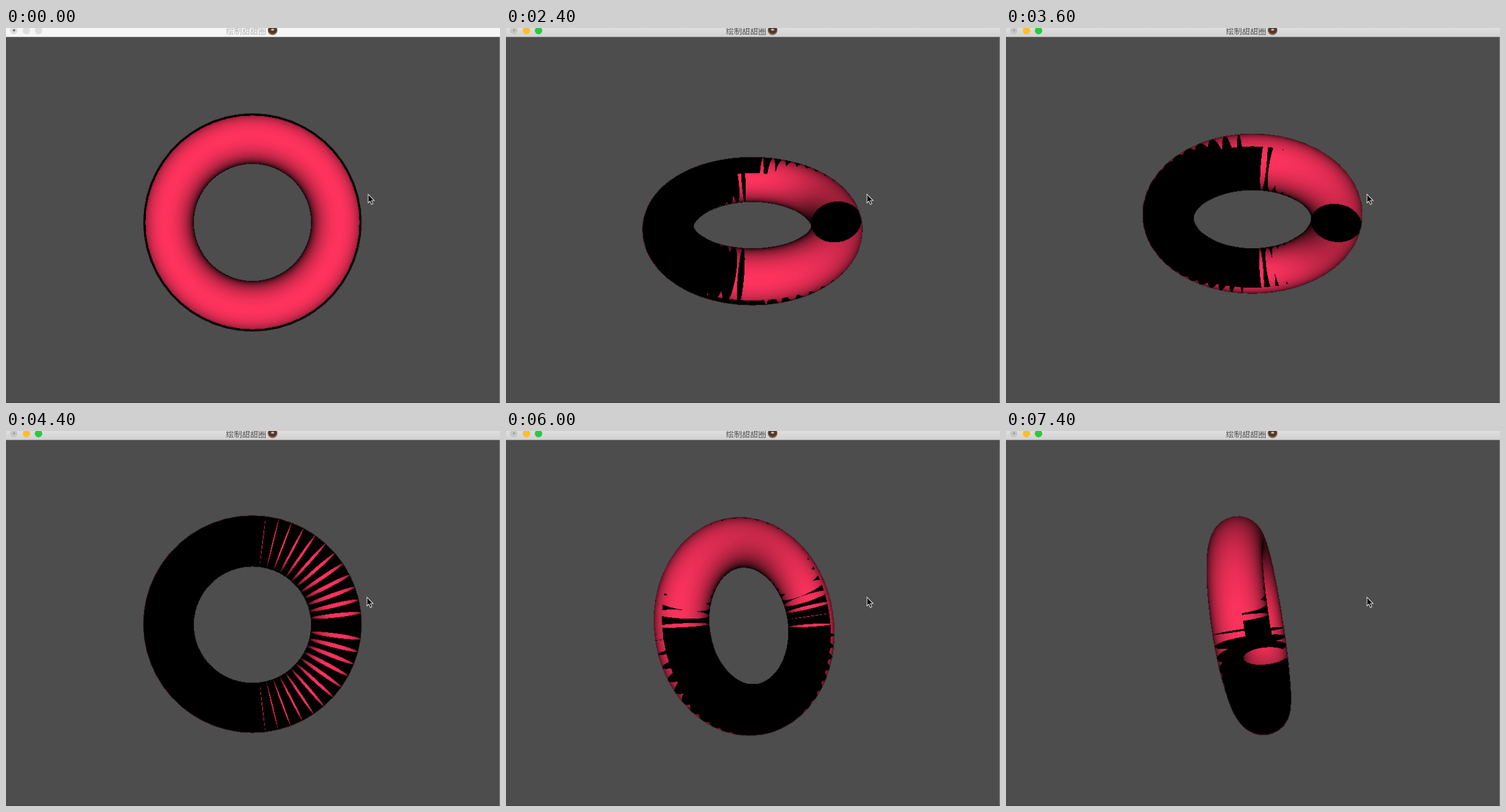
These frames come from a looping animation (858x652 px, 7600 ms). An HTML page with a canvas:

```html
<!DOCTYPE html>
<html lang="zh">
<head>
<meta charset="utf-8">
<title>绘制甜甜圈</title>
<style>
  html, body { margin: 0; width: 100%; height: 100%; overflow: hidden; background: #4d4d4d; }
  #stage { position: absolute; left: 0; top: 0; width: 858px; height: 652px; overflow: hidden; }
  #view { position: absolute; left: 0; top: 16.5px; width: 856px; height: 642px; }
  #edge { position: absolute; right: 0; top: 16px; width: 1px; height: 636px; background: #8a8a8a; }
  #base { position: absolute; left: 0; top: 651px; width: 858px; height: 1px; background: #474347; }
  #bar {
    position: absolute; left: 0; top: 0; width: 858px; height: 15px;
    background: #f6f6f6; border-bottom: 1px solid #acacac; color: #b4b4b4;
  }
  #bar.active { background: linear-gradient(#dfdfdf, #d1d1d1); border-color: #9a9a9a; color: #4c4c4c; }
  #bar i {
    position: absolute; top: -2.5px; width: 13px; height: 13px; border-radius: 50%;
    background: #dddddd;
  }
  #bar i:nth-of-type(1) { left: 7px; }
  #bar i:nth-of-type(2) { left: 28.5px; }
  #bar i:nth-of-type(3) { left: 50px; }
  #bar i:nth-of-type(1)::after {
    content: ""; position: absolute; left: 4.5px; top: 4.5px; width: 4px; height: 4px;
    border-radius: 50%; background: #6a6a6a;
  }
  #bar.active i:nth-of-type(1) { background: #c6c6c6; }
  #bar.active i:nth-of-type(1)::after { background: #a2a2a2; }
  #bar.active i:nth-of-type(2) { background: #fdbd2f; }
  #bar.active i:nth-of-type(3) { background: #2ac940; }
  #bar span {
    position: absolute; left: 382px; top: -6px; white-space: nowrap;
    font: 14px/20px "Noto Sans CJK SC", "Noto Sans CJK", sans-serif;
  }
  #bar svg { position: absolute; left: 453.5px; top: -5px; }
  #cursor { position: absolute; left: 628px; top: 288px; overflow: visible; }
  #cursor.active { left: 626px; }
</style>
</head>
<body>
<div id="stage">
  <canvas id="view" width="800" height="600"></canvas>
  <div id="edge"></div>
  <div id="base"></div>
  <div id="bar">
    <i></i><i></i><i></i>
    <span>绘制甜甜圈</span>
    <svg width="18" height="18">
      <circle cx="9" cy="9" r="8.5" fill="#8d6a4c"/>
      <ellipse cx="9" cy="8.3" rx="7.4" ry="6.6" fill="#50382e"/>
      <ellipse cx="9" cy="8" rx="2.8" ry="1.7" fill="#cfc2b6"/>
    </svg>
  </div>
  <svg id="cursor" width="14" height="21">
    <path d="M1 1V16L4.3 13L6.8 18.8L9.4 17.7L7 12H11.6Z" fill="#000" stroke="#e4e4e4" stroke-width="1.1"/>
  </svg>
</div>
<script>
const LOOP = 7600, TICK = 200, ACTIVATE = 600;
const W = 800, H = 600, DISTANCE = 7;
const FOCAL = H / 2 / Math.tan(17.5 * Math.PI / 180);
const MAJOR = 52, MINOR = 26, TUBE = 0.3;
const PINK = [255, 51, 94], GAMMA = 0.86;

const ctx = document.getElementById('view').getContext('2d');
const image = ctx.createImageData(W, H);
const pixels = new Uint32Array(image.data.buffer);
const bar = document.getElementById('bar');
const cursor = document.getElementById('cursor');

const pack = (r, g, b) => (255 << 24 | b << 16 | g << 8 | r) >>> 0;
const BACKGROUND = pack(77, 77, 77);
const shades = Uint32Array.from({ length: 256 }, (_, i) =>
  pack(...PINK.map(c => Math.round(c * (i / 255) ** GAMMA))));

// Key presses so far: one at once, then repeats after a delay.
function presses(t, first, max) {
  const delay = 440, repeat = 84;
  if (t < first) return 0;
  if (t < first + delay) return 1;
  return Math.min(max, 2 + Math.floor((t - first - delay) / repeat));
}

function turn(deg) {
  const a = deg * Math.PI / 180;
  return [Math.cos(a), Math.sin(a)];
}
const rotX = ([x, y, z], [c, s]) => [x, y * c - z * s, y * s + z * c];
const rotY = ([x, y, z], [c, s]) => [x * c + z * s, y, z * c - x * s];

function fillTriangle(p, q, r) {
  if (p.y > q.y) [p, q] = [q, p];
  if (q.y > r.y) [q, r] = [r, q];
  if (p.y > q.y) [p, q] = [q, p];
  const area = (q.x - p.x) * (r.y - p.y) - (r.x - p.x) * (q.y - p.y);
  if (Math.abs(area) < 1e-9) return;
  const dx = ((q.l - p.l) * (r.y - p.y) - (r.l - p.l) * (q.y - p.y)) / area;
  const dy = ((r.l - p.l) * (q.x - p.x) - (q.l - p.l) * (r.x - p.x)) / area;
  const along = (a, b, y) => a.x + (b.x - a.x) * (y - a.y) / (b.y - a.y);
  for (let row = Math.ceil(p.y - 0.5); row < r.y - 0.5; row++) {
    const y = row + 0.5;
    const far = along(p, r, y);
    const near = y < q.y ? along(p, q, y) : along(q, r, y);
    const end = Math.max(far, near) - 0.5;
    for (let col = Math.ceil(Math.min(far, near) - 0.5); col < end; col++) {
      const light = p.l + dx * (col + 0.5 - p.x) + dy * (y - p.y);
      pixels[row * W + col] = shades[Math.max(0, Math.min(255, Math.round(light * 255)))];
    }
  }
}

// Strips are painted in build order with no depth test, so later ones cover earlier ones.
// Each strip runs one segment past a full turn and repeats its first quad on top.
function drawTorus(transform) {
  const project = (i, j) => {
    const [ca, sa] = turn(i * 360 / MAJOR);
    const [cb, sb] = turn(j * 360 / MINOR);
    const radius = 1 + TUBE * cb;
    const [x, y, z] = transform([ca * radius, sa * radius, TUBE * sb]);
    const scale = FOCAL / (DISTANCE - z);
    const normal = transform([ca * cb, sa * cb, sb]);
    return { x: W / 2 + x * scale, y: H / 2 - y * scale, l: Math.max(0, normal[2]) };
  };
  const rings = Array.from({ length: MAJOR }, (_, i) =>
    Array.from({ length: MINOR + 2 }, (_, j) => project(i, j)));

  pixels.fill(BACKGROUND);
  rings.forEach((ring, i) => {
    const next = rings[(i + 1) % MAJOR];
    for (let j = 0; j <= MINOR; j++) {
      fillTriangle(ring[j], next[j], ring[j + 1]);
      fillTriangle(next[j], ring[j + 1], next[j + 1]);
    }
  });
  ctx.putImageData(image, 0, 0);
}

function render(t) {
  const pitch = turn(180 - 5 * presses(t, 1134, 37));
  const yaw = turn(5 * presses(t, 5016, 16));
  const tilt = turn(-5 * presses(t, 6700, 5));
  drawTorus(v => rotX(rotY(rotX(v, pitch), yaw), tilt));
  const active = t >= ACTIVATE;
  bar.classList.toggle('active', active);
  cursor.classList.toggle('active', active);
}

const start = performance.now();
let shown = -1;
function frame() {
  const t = Math.floor((performance.now() - start) % LOOP / TICK) * TICK;
  if (t !== shown) render(shown = t);
  requestAnimationFrame(frame);
}
frame();
</script>
</body>
</html>
```
